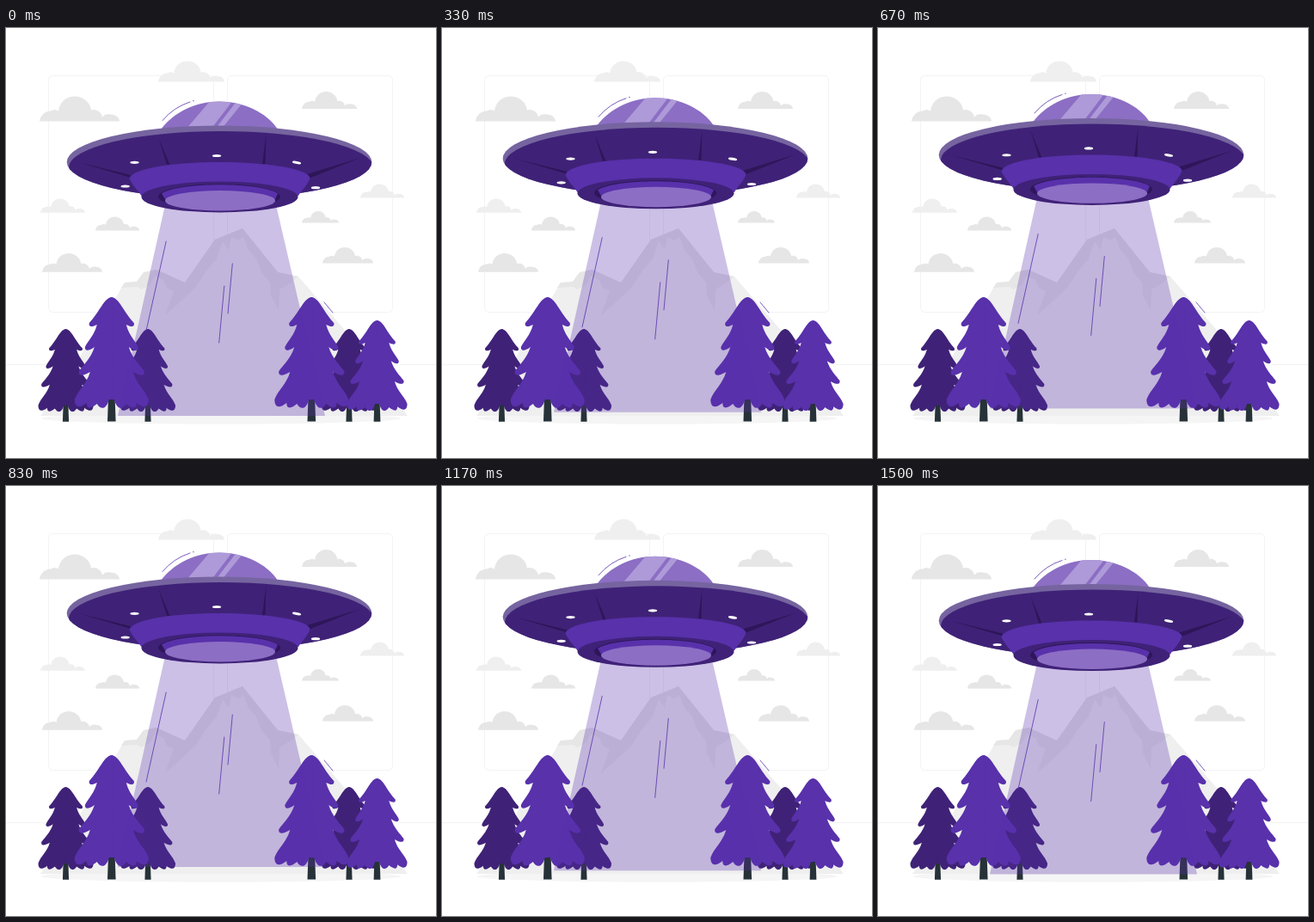
Recreate the animation shown at these times as an HTML page. Size 500 by 500 pixels, loop 1540 ms.

```html
<!DOCTYPE html>
<html lang="en">
<head>
<meta charset="utf-8">
<title>Hovering saucer</title>
<style>
  html, body { margin: 0; height: 100%; overflow: hidden; background: #fff; }
  svg { display: block; width: 100vw; height: 100vh; }
  .dark { fill: #3f2277; }
  .main { fill: #5831ab; }
  .light { fill: #8c6ec4; }
  .shade { fill: #2e1659; }
  .line { fill: none; stroke: #5831ab; stroke-width: .8; stroke-linecap: round; }
  .grey { fill: #e6e6e6; }
  .pale { fill: #efefef; }
</style>
</head>
<body>
<svg viewBox="0 0 500 500">
  <defs>
    <path id="cloud" d="M0 29C1 22 6 17 13 17C16 15 19 15 22 17C23 7 31 0 41 0C51 0 59 7 60 16C66 14 72 18 73 24C75 21 79 20 83 21C89 21 93 25 93 29Z"/>
    <path id="half" d="M-1 0H0C9 1 13 16 26 30C27 35 23 35 17 32C20 44 27 50 31 58C31 63 27 63 20 58C24 71 33 79 38 86C39 92 34 92 25 87C29 101 39 108 43 119C43 128 38 130 29 123C29 131 23 129 17 124C12 132 6 130 3 119H-1Z"/>
    <g id="tree">
      <path d="M-3.6 110H3.6L4.8 144.5H-4.8Z" fill="#263238"/>
      <use href="#half"/>
      <use href="#half" transform="scale(-1 1)"/>
    </g>
    <clipPath id="hull"><ellipse cx="248" cy="156" rx="177.3" ry="42.5"/></clipPath>
    <clipPath id="dome"><path d="M180 118C195 98 220 85.5 248 85.5S303 98 316 118Z"/></clipPath>
  </defs>

  <g fill="none" stroke="#f3f3f3">
    <rect x="49.5" y="55.5" width="192" height="275" rx="5"/>
    <rect x="257.5" y="55.5" width="192" height="275" rx="5"/>
    <path d="M0 391.5H500"/>
  </g>
  <g id="clouds"></g>

  <ellipse cx="250" cy="454" rx="209" ry="6.5" fill="#f5f5f5"/>
  <path class="pale" d="M40 451L60 425L125 318L138 296L152 295L160 284L175 281L208 296L243 246L275 233L316 284L340 289L392 349L467 451Z"/>
  <path class="grey" d="M134 302L138 296L152 295L160 284L175 281L208 296L243 246L275 233L316 284L340 289L330 297L318 304L317 329L308 310L307 296L297 284L291 268L282 258L276 243L270 247L262 243L259 258L252 248L245 268L234 281L220 302L203 318L185 334L195 306L187 302L183 293L173 288L167 299L157 304L153 301Z"/>

  <g id="trees"></g>
  <path class="line" d="M370 319L380 331"/>

  <g id="saucer">
    <path d="M184.5 208H314.5L371 451H130Z" fill="#5831ab" fill-opacity=".3"/>
    <path class="line" d="M186.200 248L163 352M263.300 274L258 332M253.800 300L247.700 366"/>

    <g clip-path="url(#dome)">
      <path class="light" d="M170 80H330V120H170Z"/>
      <path d="M238 84H264L238 118H209ZM269 84L276 86L250 118H243Z" fill="#ae9ad8"/>
    </g>
    <path class="line" d="M182 107.500Q195 92 214 86M217.500 84.700H218.300"/>

    <g clip-path="url(#hull)">
      <path d="M60 100H440V210H60Z" fill="#7664a0"/>
      <ellipse class="dark" cx="250" cy="162" rx="177" ry="42"/>
    </g>
    <path class="shade" d="M177.500 128L190.500 159H187ZM302.500 123L301.500 158H298ZM84 156L145 171V174ZM412 151L352 175L350 170Z"/>

    <path class="main" d="M143.500 175C147 163 196 156 248 156S350 163 353.500 174C352 181 345 187 340 195Q250 220 158 196C153 188 146 182 143.500 175Z"/>
    <ellipse class="dark" cx="248.500" cy="196.500" rx="91" ry="18"/>
    <ellipse class="shade" cx="248" cy="196" rx="71" ry="14.500"/>
    <path class="main" d="M181 192.500C201 179 296 179 316 192.500L312 201H186Z"/>
    <ellipse class="light" cx="249" cy="200.700" rx="64" ry="11.700"/>

    <g fill="#fff">
      <ellipse cx="149.500" cy="156.300" rx="5.200" ry="1.600"/>
      <ellipse cx="245" cy="148.500" rx="5.200" ry="1.600"/>
      <ellipse cx="338" cy="156.500" rx="5.200" ry="1.600" transform="rotate(10 338 156.500)"/>
      <ellipse cx="138.700" cy="184" rx="5.200" ry="1.600"/>
      <ellipse cx="360" cy="185.700" rx="5.200" ry="1.600"/>
    </g>
  </g>
</svg>
<script>
  const place = (group, shape, cls, x, y, scale) =>
    document.getElementById(group).insertAdjacentHTML('beforeend',
      `<use href="#${shape}" class="${cls}" transform="translate(${x} ${y}) scale(${scale})"/>`);

  // Clouds: left, top, width
  [['grey', 39, 79.5, 93], ['pale', 177, 38.5, 77], ['grey', 344, 74, 64],
   ['pale', 412, 181.5, 51], ['grey', 344, 213, 43], ['grey', 368, 255, 59],
   ['grey', 104, 219.5, 51], ['pale', 40, 198.5, 52], ['grey', 42, 262, 70]]
    .forEach(([cls, x, y, w]) => place('clouds', 'cloud', cls, x, y, w / 93));

  // Trees: tip position and scale, back to front
  [['dark', 69.5, 350, .745], ['dark', 165, 350, .745], ['dark', 399, 350, .745],
   ['main', 122.8, 313, 1], ['main', 355.3, 313, 1], ['main', 431.5, 340, .815]]
    .forEach(([cls, x, y, s]) => place('trees', 'tree', cls, x, y, s));

  // Steady rise and fall; the lowest point comes 40 ms before the loop ends
  const LOOP = 1540, LEAD = 40, TRAVEL = 9.8;
  const saucer = document.getElementById('saucer');
  const height = t => TRAVEL * (1 - Math.abs(1 - 2 * ((t + LEAD) % LOOP) / LOOP));
  function draw() {
    const dy = height(0) - height(performance.now());
    saucer.setAttribute('transform', `translate(0 ${dy.toFixed(2)})`);
    requestAnimationFrame(draw);
  }
  draw();
</script>
</body>
</html>
```
